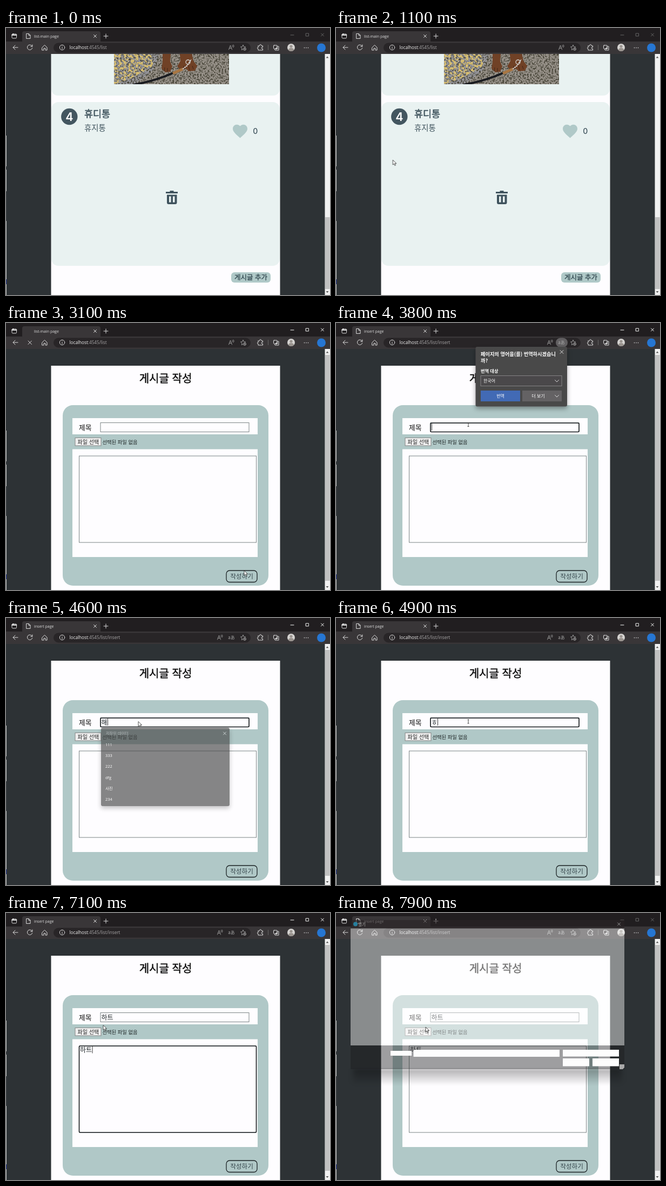
Recreate the animation shown at these times as an HTML page. Size 600x494 px, loop 8000 ms.

```html
<!DOCTYPE html>
<html lang="ko">
<head>
<meta charset="utf-8">
<title>list-main page</title>
<style>
html, body { margin: 0; width: 100%; height: 100%; overflow: hidden; background: #2d3235; }
svg { display: block; }
text { font-family: "Noto Sans CJK KR", "Noto Sans CJK", "Noto Sans", sans-serif; }
.ui { font-family: "Open Sans", "Noto Sans CJK KR", sans-serif; }
.digit { font-family: Inter, sans-serif; font-weight: 500; }
.mid { stroke: currentColor; stroke-width: .3; }
.icon { fill: none; stroke: #dcdcdc; stroke-width: 1; stroke-linecap: round; stroke-linejoin: round; }
.dim { stroke: #999; }
.idle { stroke: #666; }
.field { fill: #fefdff; stroke: #7b8484; }
.focus { fill: #fefdff; stroke: #151a1c; stroke-width: 1.6; }

/* Hard switches share one 8 s clock. */
.step { animation: 8s step-end infinite; }
.list { animation-name: list; }
.form { animation-name: form; }
.active { animation-name: active; }
.oldTab { animation-name: oldTab; }
.newTab { animation-name: newTab; }
.favicon { animation-name: favicon; }
.loading { animation-name: loading; }
.oldTools { animation-name: oldTools; }
.newTools { animation-name: newTools; }
.prompt { animation-name: prompt; }
.titleFocus { animation-name: titleFocus; }
.bodyFocus { animation-name: bodyFocus; }
.typeTitle { animation-name: typeTitle; }
.typeBody { animation-name: typeBody; }
.beam { animation-name: beam; }
.arrow { animation-name: arrow; }
.saved { animation: saved 8s linear infinite; }
.mouse { animation: mouse 8s linear infinite; }
.dialog { animation: dialog 8s linear infinite; transform-origin: 280px 151px; }

@keyframes list { 0% { opacity: 1 } 37.5%, to { opacity: 0 } }
@keyframes form { 0% { opacity: 0 } 37.5%, to { opacity: 1 } }
@keyframes active { 0% { opacity: 0 } 36.25% { opacity: 1 } 96.25%, to { opacity: 0 } }
@keyframes oldTab { 0% { opacity: 1 } 41.25%, to { opacity: 0 } }
@keyframes newTab { 0% { opacity: 0 } 41.25%, to { opacity: 1 } }
@keyframes favicon { 0% { opacity: 1 } 37.5% { opacity: 0 } 41.25%, to { opacity: 1 } }
@keyframes loading { 0% { opacity: 0 } 37.5% { opacity: 1 } 41.25%, to { opacity: 0 } }
@keyframes oldTools { 0% { opacity: 1 } 43.75%, to { opacity: 0 } }
@keyframes newTools { 0% { opacity: 0 } 43.75%, to { opacity: 1 } }
@keyframes prompt { 0% { opacity: 0 } 43.75% { opacity: 1 } 48.75%, to { opacity: 0 } }
@keyframes titleFocus { 0% { opacity: 0 } 46.25% { opacity: 1 } 68.75%, to { opacity: 0 } }
@keyframes bodyFocus { 0% { opacity: 0 } 68.75% { opacity: 1 } 95%, to { opacity: 0 } }
@keyframes typeTitle {
  0% { transform: translateY(0) }
  46.25% { transform: translateY(-20px) }
  56.25%, 61.25% { transform: translateY(-40px) }
  57.5% { transform: translateY(-80px) }
  62.5% { transform: translateY(-60px) }
  65% { transform: translateY(-100px) }
  66.25% { transform: translateY(-120px) }
  68.75%, to { transform: translateY(-140px) }
}
@keyframes typeBody {
  0% { transform: translateY(0) }
  68.75% { transform: translateY(-20px) }
  75% { transform: translateY(-40px) }
  76.25% { transform: translateY(-60px) }
  78.75% { transform: translateY(-100px) }
  80% { transform: translateY(-120px) }
  95%, to { transform: translateY(-140px) }
}
@keyframes saved {
  0%, 49.99% { opacity: 0 }
  50%, 56.25% { opacity: 1 }
  57.5% { opacity: .67 }
  58.75%, to { opacity: 0 }
}
@keyframes beam { 0% { opacity: 0 } 46% { opacity: 1 } 50% { opacity: 0 } 58.75% { opacity: 1 } 86%, to { opacity: 0 } }
@keyframes arrow { 0% { opacity: 1 } 46% { opacity: 0 } 50% { opacity: 1 } 58.75% { opacity: 0 } 86%, to { opacity: 1 } }
@keyframes mouse {
  0%, 7.5% { transform: translate(-20px, 290px) }
  15% { transform: translate(130px, 235px) }
  23%, 28% { transform: translate(159px, 203px) }
  35%, 37.5% { transform: translate(447px, 459px) }
  38.75%, 42% { transform: translate(441px, 458px) }
  46%, 48.75% { transform: translate(245px, 188px) }
  50%, 83% { transform: translate(245px, 191.5px) }
  90%, to { transform: translate(166px, 211px) }
}
@keyframes dialog {
  0%, 96.25% { opacity: 0; transform: scale(.95) }
  98.75%, to { opacity: 1; transform: none }
}
</style>
</head>
<body>
<svg width="600" height="494" viewBox="0 0 600 494">
  <defs>
    <clipPath id="photo"><rect x="200" y="48" width="213" height="56"/></clipPath>
    <filter id="leaves" x="0" y="0" width="1" height="1" color-interpolation-filters="sRGB">
      <feTurbulence type="fractalNoise" baseFrequency=".22" numOctaves="2" seed="4"/>
      <feColorMatrix values="0 0 0 0 .84 0 0 0 0 .74 0 0 0 0 .44 0 0 0 11 -5.400"/>
      <feComposite in2="SourceGraphic" operator="in"/>
    </filter>
    <filter id="grit" x="0" y="0" width="1" height="1" color-interpolation-filters="sRGB">
      <feTurbulence type="fractalNoise" baseFrequency=".35" numOctaves="3" seed="9"/>
      <feColorMatrix values="0 0 0 0 .29 0 0 0 0 .28 0 0 0 0 .23 0 0 0 5 -2.300"/>
      <feComposite in2="SourceGraphic" operator="in"/>
    </filter>
    <filter id="shade" x="-20%" y="-20%" width="140%" height="150%">
      <feDropShadow dx="0" dy="4" stdDeviation="4" flood-opacity=".35"/>
    </filter>
    <filter id="soft" x="-10%" width="120%" y="-30%" height="160%"><feGaussianBlur stdDeviation="5 2"/></filter>
    <linearGradient id="fall" x2="0" y2="1">
      <stop stop-opacity=".3"/><stop offset="1" stop-opacity="0"/>
    </linearGradient>
    <path id="close" d="M-2.5-2.5l5 5m0-5l-5 5"/>
    <path id="chevron" d="M-3.5-1.5l3.5 3.5 3.5-3.5"/>
    <path id="aloud" d="M-4.5 4l3-8 3 8m-5-2.7h4M2.2-4q1.6 1.5 0 3M4-5q2.6 2.5 0 5"/>
    <path id="controls" d="M527 13h6M555.500 10h5v5h-5zM583.500 10l5 5m0-5l-5 5"/>
    <g id="lines" font-size="12" fill="#20282b">
      <path d="M1.500 22v13M12.500 42v13M12.500 62v13M12.500 82v13M12.500 102v13M23.500 122v13" stroke="#222" stroke-width=".9"/>
      <text x=".5" y="53.500">ㅎ</text>
      <text x=".5" y="73.500">하</text>
      <text x=".5" y="93.500">해</text>
      <text x=".5" y="113.500">핱</text>
      <text x=".5" y="133.500">하트</text>
      <text x=".5" y="153.500">하트</text>
    </g>
  </defs>

  <rect width="600" height="494" fill="#2d3235"/>

  <g class="step list">
    <rect x="83.500" y="48" width="424" height="446" fill="#fefdff"/>
    <path d="M84 48H507V113a12 12 0 0 1-12 12H96a12 12 0 0 1-12-12z" fill="#e9f2f1"/>
    <g clip-path="url(#photo)">
      <rect x="200" y="48" width="213" height="56" fill="#98928a"/>
      <path d="M200 48h84l-12 30-34 26h-38z" fill="#96969b"/>
      <rect x="200" y="48" width="213" height="56" filter="url(#grit)"/>
      <path d="M200 48h68l5 22-33 20-40 14z" filter="url(#leaves)"/>
      <path d="M290 48h15l-1 14 4 9-4 10-9 1-7-7 2-12zM322 48h22l3 13 7 9-4 9-12 1-5-5-9 3-7-7 6-10z" fill="#704126"/>
      <path d="M294 73l-1 7m6-6v7M329 70l2 7m7-7l2 8m5-8l2 6" stroke="#3f2417" fill="none"/>
      <path d="M236 105q40-7 74-22" stroke="#191b20" stroke-width="4" fill="none"/>
      <path d="M309 84l18-8" stroke="#a97642" stroke-width="5"/>
      <path d="M327 76l8-6 8-12" stroke="#d8d8d8" stroke-width="2" stroke-dasharray="3 1" fill="none"/>
      <circle cx="337" cy="63" r="4" fill="none" stroke="#d2d2d2" stroke-width="1.300"/>
    </g>
    <rect x="84" y="137" width="423" height="303" rx="13" fill="#e9f2f1"/>
    <circle cx="117.300" cy="164" r="15.200" fill="#435660"/>
    <text class="digit" x="117.300" y="171.700" font-size="21.500" text-anchor="middle" fill="#fff" style="font-weight:600">4</text>
    <g fill="#3f535d" color="#3f535d">
      <text class="mid" x="145" y="165" font-size="17.400" style="stroke-width:.5">휴디통</text>
      <text x="145" y="189.500" font-size="14.400">휴지통</text>
      <text class="digit" x="457.300" y="195.500" font-size="14">0</text>
      <path d="M303.500 303v-2h7v2h7.500v3h-22v-3zM298 308.500h18.500V323a3 3 0 0 1-3 3h-12.500a3 3 0 0 1-3-3z"/>
    </g>
    <path d="M302 311.500h3.500v11H302zM309 311.500h3.500v11H309z" fill="#e9f2f1"/>
    <path transform="translate(417.300 174.700) scale(1.35)" fill="#b0c9c8" d="M12 21.350l-1.450-1.320C5.400 15.360 2 12.280 2 8.500 2 5.420 4.420 3 7.500 3c1.740 0 3.410.810 4.500 2.090C13.090 3.810 14.760 3 16.500 3 19.580 3 22 5.420 22 8.500c0 3.780-3.400 6.860-8.550 11.540z"/>
    <rect x="417" y="452" width="73" height="19" rx="6" fill="#b0c9c8"/>
    <text class="mid" x="453.500" y="466" font-size="12.500" text-anchor="middle" fill="#30464e" color="#30464e">게시글 추가</text>
  </g>

  <g class="step form">
    <rect x="83.500" y="79" width="424" height="415" fill="#fefdff"/>
    <text class="mid" x="295.500" y="109.500" font-size="20" text-anchor="middle" fill="#111" color="#111" style="stroke-width:.5">게시글 작성</text>
    <rect x="105" y="152" width="381" height="334" rx="19" fill="#b0c8c7"/>
    <path d="M123 176h343v30H123zM123 233.500h343v199.500H123z" fill="#fefdff"/>
    <text x="135" y="197.500" font-size="12.800" fill="#111">제목</text>
    <rect class="field" x="175" y="184.500" width="275" height="17"/>
    <rect class="field" x="135.500" y="246" width="328" height="160"/>
    <rect x="128" y="212.500" width="48" height="14.500" fill="#efefef" stroke="#868686"/>
    <text x="152.300" y="223.500" font-size="10" text-anchor="middle" fill="#222">파일 선택</text>
    <text x="178.500" y="223.500" font-size="9.300" fill="#1e2626">선택된 파일 없음</text>
    <rect x="408" y="458" width="57" height="21.500" rx="6" fill="#b0c8c7" stroke="#1c2325" stroke-width="1.300"/>
    <text x="436.500" y="473" font-size="11.600" text-anchor="middle" fill="#34444a">작성하기</text>
  </g>
  <rect class="focus step titleFocus" x="175" y="185" width="275" height="16.500" rx="2"/>
  <rect class="focus step bodyFocus" x="135.500" y="246" width="328" height="160" rx="2"/>
  <svg x="176" y="184" width="60" height="18"><g class="step typeTitle"><use href="#lines"/></g></svg>
  <svg x="136.500" y="244.500" width="60" height="18"><g class="step typeBody"><use href="#lines"/></g></svg>

  <!-- scrollbar -->
  <rect x="590.500" y="48" width="9.500" height="446" fill="#f1f1f1"/>
  <rect class="step list" x="591" y="350" width="8.500" height="133" fill="#c1c1c1"/>
  <rect class="step form" x="591" y="59" width="8.500" height="418" fill="#c1c1c1"/>
  <path d="M592.500 55.500l2.500-3 2.500 3zM592.500 487l2.500 3 2.500-3z" fill="#555"/>

  <!-- window frame -->
  <path d="M0 0h600v26H0z" fill="#211e20"/>
  <path d="M0 25h600v23H0z" fill="#393638"/>
  <path d="M30 26V10a4 4 0 0 1 4-4H171a4 4 0 0 1 4 4V26z" fill="#393638"/>
  <rect x="88" y="27.500" width="365" height="18" rx="9" fill="#282527"/>
  <path d="M.5 199V494" stroke="#c8c8c8"/>
  <path d="M.5 256v6M.5 302v55" stroke="#42474b"/>
  <path d="M.5 465v9" stroke="#3046a8"/>

  <g class="icon">
    <rect x="11" y="11" width="8.500" height="8" rx="1.500"/>
    <path d="M11 13h8.500M13.500 13v-2" stroke-width="1.800"/>
    <use href="#close" x="165" y="15"/>
    <path d="M181 15h8m-4-4v8"/>
    <path d="M22 36h-9m4-4l-4 4 4 4"/>
    <path d="M67 36l4.500-4.500 4.500 4.500v5h-3v-3.500h-3v3.500h-3z"/>
    <circle cx="104" cy="36" r="4.700"/>
    <path d="M104 35.500v3M104 33.500v.1"/>
    <path class="dim" d="M439 31.500l1.500 3 3.300.5-2.300 2.400M436.500 40.500l.5-3.200-2.600-2.300 3.300-.5 1.300-3M436.500 40.500l2-1"/>
    <circle class="dim" cx="442" cy="39" r="2.500"/>
    <path class="dim" d="M440.800 39h2.400M442 37.800v2.400"/>
    <path d="M467 33h2.500q0-2.500 1.800-2.500t1.700 2.500h2.500v2.500q-2.500 0-2.500 1.500t2.500 1.500v2.500H467v-2.500q-1.500 0-1.500-1.500t1.500-1.500z"/>
    <path d="M485.500 31.500v9" stroke="#666"/>
    <rect x="495.500" y="32" width="6.500" height="6.500" rx="1"/>
    <path d="M498 38.500v2.500h7v-7h-3M501.500 35.500v4m-2-2h4"/>
    <path d="M552.500 36.500v.1m3.500-.1v.1m3.500-.1v.1" stroke-width="1.600"/>
  </g>
  <circle cx="528" cy="36" r="7" fill="#d6d4d2"/>
  <path d="M523 41q0-4 5-4t5 4q-2 2-5 2t-5-2z" fill="#99938e"/>
  <circle cx="528" cy="34" r="2.600" fill="#99938e"/>
  <circle cx="584" cy="36.500" r="8" fill="#2676d2"/>

  <use class="icon idle" href="#controls"/>
  <use class="icon step active" href="#controls"/>
  <path class="icon step favicon" d="M38 10.500h4l3 3v6h-7zM42 10.500v3h3"/>
  <path class="icon step loading" d="M41 33l6.500 6.500m0-6.500l-6.500 6.500"/>
  <path class="icon step favicon" d="M48.500 34a4.700 4.700 0 1 0 .2 3M48.800 31v3.200h-3.200"/>

  <g class="step oldTab">
    <text class="ui" x="52" y="17.500" font-size="7" fill="#ddd">list-main page</text>
    <text class="ui" x="117.500" y="39" font-size="8.200" fill="#a7a5a6"><tspan fill="#f2f2f2">localhost</tspan>:4545/list</text>
  </g>
  <g class="step newTab">
    <text class="ui" x="52" y="17.500" font-size="7" fill="#ddd">insert page</text>
    <text class="ui" x="117.500" y="39" font-size="8.200" fill="#a7a5a6"><tspan fill="#f2f2f2">localhost</tspan>:4545/list/insert</text>
  </g>
  <use class="icon dim step oldTools" href="#aloud" x="417" y="36"/>
  <rect class="step prompt" x="407" y="27.500" width="22" height="17.500" rx="8.700" fill="#626062"/>
  <g class="step newTools">
    <use class="icon dim" href="#aloud" x="396" y="36"/>
    <text x="417.500" y="39" font-size="8" text-anchor="middle" fill="#aaa">aあ</text>
  </g>

  <!-- translation prompt -->
  <g class="step prompt">
    <rect x="258.500" y="44" width="169.500" height="110.500" rx="3" fill="#4a484a" filter="url(#shade)"/>
    <g fill="#fff" font-size="8">
      <g font-weight="700">
        <text x="268" y="60.500" font-size="9.200">페이지의 영어을(를) 번역하시겠습니</text>
        <text x="268" y="72.500" font-size="9.200">까?</text>
        <text x="268" y="91.500" font-size="8.200">번역 대상</text>
      </g>
      <rect x="268" y="97.500" width="150" height="19" fill="#4a484a" stroke="#858385"/>
      <text x="273" y="110">한국어</text>
      <rect x="268" y="125" width="73" height="20" fill="#426ab5"/>
      <text x="304.500" y="138" text-anchor="middle">번역</text>
      <rect x="345" y="125" width="73" height="20" fill="#646264"/>
      <text x="374.500" y="138" text-anchor="middle">더 보기</text>
      <g class="icon">
        <use href="#chevron" x="409" y="107"/>
        <use href="#chevron" x="409" y="135"/>
        <path d="M415 50.500l6 6m0-6l-6 6"/>
      </g>
    </g>
  </g>

  <!-- saved entries -->
  <g class="saved">
    <rect x="176" y="203" width="238" height="145" rx="3" fill="#4a484a" filter="url(#shade)"/>
    <text x="185" y="216" font-size="7.200" fill="#b5b3b5">저장된 데이터</text>
    <use class="icon" href="#close" x="405" y="213.500"/>
    <g font-size="7.400" fill="#fff">
      <text class="ui" x="184" y="237">111</text>
      <text class="ui" x="184" y="257">333</text>
      <text class="ui" x="184" y="277">222</text>
      <text class="ui" x="184" y="297.500">dfg</text>
      <text class="ui" x="184" y="318">사진</text>
      <text class="ui" x="184" y="338">234</text>
    </g>
  </g>

  <!-- file dialog -->
  <g class="dialog">
    <rect x="32" y="289" width="497" height="30" fill="url(#fall)" filter="url(#soft)"/>
    <rect x="27" y="13" width="507" height="15.500" fill="#2a2526" opacity=".62"/>
    <rect x="27" y="28.500" width="507" height="216.500" fill="#fff" opacity=".44"/>
    <rect x="27" y="245" width="507" height="44" fill="#1c1c1e" opacity=".42"/>
    <circle cx="36" cy="20.500" r="4" fill="#287f9d"/>
    <text x="41" y="23.500" font-size="7.500" fill="#aaa">열기</text>
    <use class="icon dim" href="#close" x="524" y="20.500"/>
    <path d="M101 255h39v9h-39zM143.500 253h270.500v13H143.500zM420 253h104v12.500H420zM420 269h49v14.500H420zM475 269h49v14.500H475z" fill="#fdfdfd"/>
    <path d="M525 280h9v6l-3 3h-6z" fill="#a9a9a9"/>
  </g>

  <!-- pointer -->
  <g class="mouse">
    <path class="step arrow" d="M0 0v9l2.100-1.900 1.600 3.300 1.500-.7-1.500-3.200h2.900z" fill="#fff" stroke="#222" stroke-width=".8"/>
    <path class="step beam" d="M-1.500-3.500h3M0-3.500v7M-1.500 3.500h3" stroke="#333" stroke-width=".9" fill="none"/>
  </g>
</svg>
</body>
</html>
```
